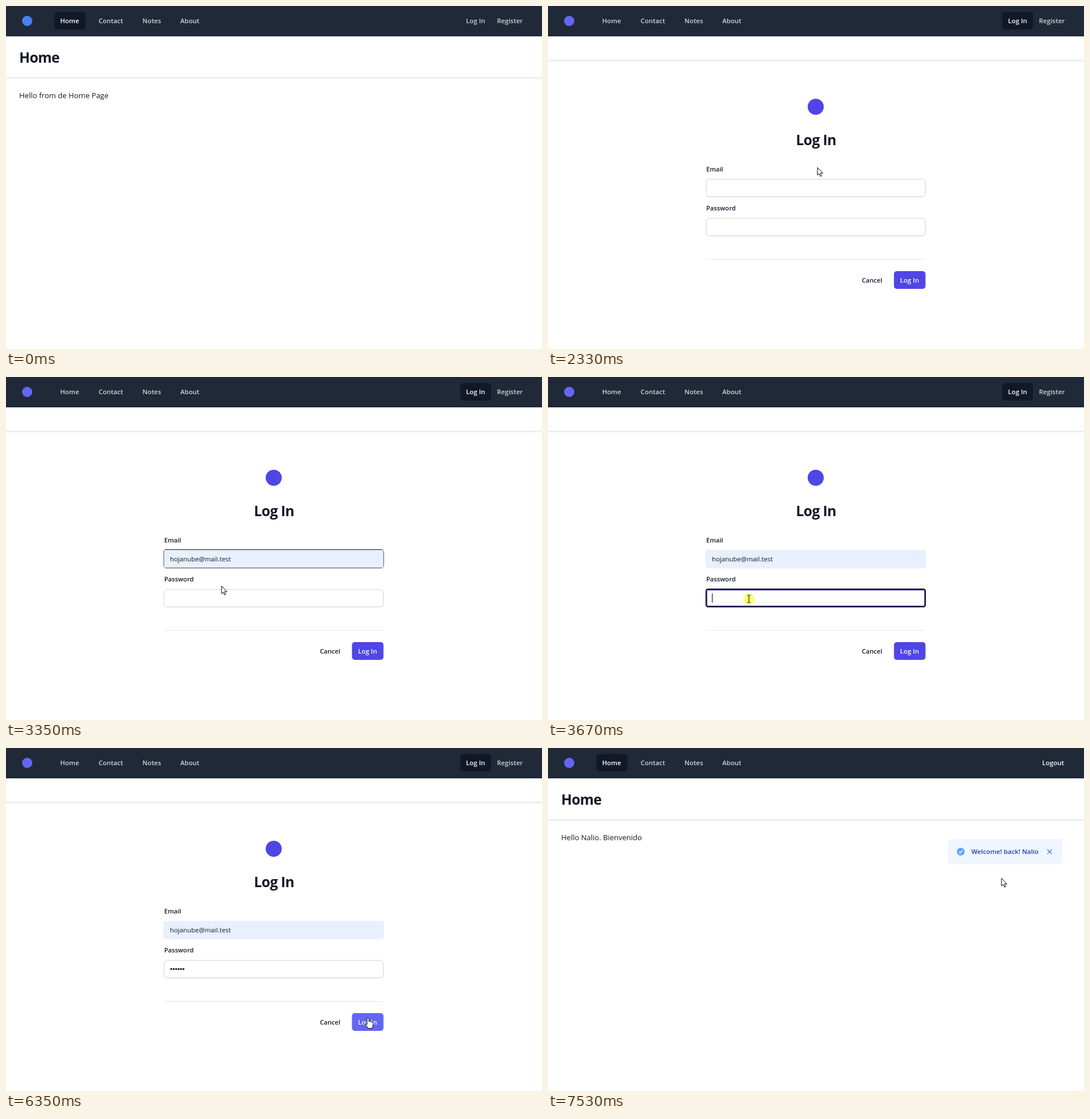
These frames come from a looping animation (935x599 px, 8000 ms). An HTML page:

```html
<!DOCTYPE html>
<html lang="en">
<head>
<meta charset="utf-8">
<title>Log in flow</title>
<style>
  html, body { margin: 0; width: 100%; height: 100%; overflow: hidden; background: #fff; }
  svg { display: block; width: 935px; height: 599px; }
  text { font: 600 11.4px "Open Sans", "Noto Sans", sans-serif; fill: #111827; white-space: pre; }
  .nav text { fill: #d1d5db; }
  .nav .on, .white { fill: #fff; }
  .pill { fill: #111827; }
  .title { font-size: 24.6px; font-weight: 700; letter-spacing: -.025em; }
  .body { font-size: 13px; font-weight: 400; }
  .label { font-size: 11.1px; }
  .value { font-weight: 400; }
  #list text { font-size: 10.9px; font-weight: 500; }
  .rule { fill: #e5e7eb; }
  .field { fill: #fff; stroke: #d1d5db; }
  .ring { fill: #fff; stroke: #12122b; stroke-width: 2.4; }
  .ring + rect { fill: none; stroke: #6366f1; stroke-width: .8; }
  .soft { filter: drop-shadow(0 1px 1px #0001); }
  .pointer { fill: #fff; stroke: #000; stroke-width: 1; stroke-linejoin: round; }
</style>
</head>
<body>
<svg viewBox="0 0 935 599">
  <g class="nav">
    <rect width="935" height="53" fill="#1f2937"/>
    <circle id="logo" cx="37" cy="26" r="9"/>
    <rect id="homePill" class="pill" x="84.5" y="10.5" width="54" height="30.5" rx="5"/>
    <rect id="loginPill" class="pill" x="792.5" y="10.5" width="53.5" height="30.5" rx="5"/>
    <text id="homeLink" x="94.5" y="30">Home</text>
    <text x="161.5" y="30">Contact</text>
    <text x="238" y="30">Notes</text>
    <text x="304" y="30">About</text>
    <g id="guest">
      <text id="loginLink" x="802.5" y="30">Log In</text>
      <text x="856.5" y="30">Register</text>
    </g>
    <text id="logout" class="on" x="862" y="30">Logout</text>
  </g>

  <g id="home">
    <text class="title" x="23" y="99">Home</text>
    <rect class="rule soft" y="124.5" width="935" height="1.5"/>
    <text id="greeting" class="body" x="23" y="160.5"></text>
    <g id="toast">
      <rect x="697.5" y="159" width="200" height="44" rx="5" fill="#eff6ff"/>
      <circle cx="720" cy="181" r="6.8" fill="#60a5fa"/>
      <path d="M717 181.2l2.1 2.2 3.8-4.8" fill="none" stroke="#fff" stroke-width="1.4"/>
      <text x="738.5" y="185" fill="#1e40af" style="fill:#1e40af">Welcome! back! Nalio</text>
      <path d="M871 177l8 8m0-8l-8 8" stroke="#3b82f6" stroke-width="1.3"/>
    </g>
  </g>

  <g id="login">
    <rect class="rule soft" y="94" width="935" height="1.5"/>
    <circle id="mark" cx="467" cy="176" r="14" fill="#4f46e5"/>
    <text class="title" x="467.5" y="242.5" text-anchor="middle">Log In</text>
    <text class="label" x="276" y="289">Email</text>
    <text class="label" x="276" y="357">Password</text>
    <rect class="field soft" x="276" y="302.5" width="382" height="30" rx="5"/>
    <rect class="field soft" x="276" y="371" width="382" height="30" rx="5"/>
    <g id="emailFocus">
      <rect class="ring" x="276" y="302.2" width="382" height="30.4" rx="3"/>
      <rect x="277.8" y="304" width="378.6" height="27" rx="3"/>
    </g>
    <g id="filled">
      <rect x="275.5" y="302" width="383" height="31" rx="2" fill="#e8f0fe"/>
      <text class="value" x="286" y="321.8">hojanube@mail.test</text>
    </g>
    <g id="passFocus">
      <rect class="ring" x="276" y="370.7" width="382" height="30.4" rx="3"/>
      <rect x="277.8" y="372.5" width="378.6" height="27" rx="3"/>
    </g>
    <g id="dots"></g>
    <rect id="caret" width="1" height="16"/>
    <rect class="rule" x="276" y="442" width="382" height="1"/>
    <text x="547.5" y="483" class="label">Cancel</text>
    <rect id="button" x="603.5" y="463" width="55" height="31" rx="5"/>
    <text class="white" style="fill:#fff" x="614" y="483">Log In</text>
    <g id="list">
      <rect x="360.5" y="341" width="193.5" height="191" rx="5" fill="#f7fbff"
        style="filter:drop-shadow(0 1px 2px #0005)"/>
      <rect x="363.5" y="344" width="187.5" height="30.5" rx="4" fill="#e9eef1"/>
      <path d="M531.7 355.7l7 7m0-7l-7 7" stroke="#1f2937" stroke-width="1.4"/>
    </g>
  </g>

  <g id="cursor">
    <circle id="click" r="10" fill="#ffff80"/>
    <path id="arrow" class="pointer" d="M0 0V13.5L3 10.7 5 15.5 7.2 14.6 5.2 9.9H9.5Z"/>
    <path id="hand" class="pointer" d="M-1.6 1.6Q0-.8 1.6 1.6V6.5Q3.2 5.3 4.2 6.9 5.8 5.9 6.7 7.6 8.3 6.9 8.8 8.8V13Q8.8 16 7 18.5H-.2Q-1.5 15.5-4.6 11.8-4.6 9.8-1.6 12Z"/>
    <path id="beam" d="M-3-6.5H-1L0-6 1-6.5H3M0-6V6M-3 6.5H-1L0 6 1 6.5H3" fill="none" stroke="#000"/>
  </g>
</svg>
<script>
const LOOP = 8000;
const $ = id => document.getElementById(id);
const show = (id, on) => { $(id).style.display = on ? '' : 'none'; };

// Pointer samples as the screen recorder took them: time, x, y, shape, clicking
const pointer = [
  [0, 0, 0, ''],
  [340, 825, 440, 'arrow'], [500, 823, 330, 'arrow'], [670, 821, 190, 'arrow'],
  [830, 821, 90, 'arrow'], [1000, 823, 34, 'hand'], [1160, 823.5, 24, 'hand'],
  [1830, 770, 76, 'arrow'], [2000, 610, 190, 'arrow'], [2170, 470, 282, 'arrow'],
  [2340, 402, 312, 'beam'], [2510, 391, 314, 'beam'], [2670, 391, 314, 'beam', 1],
  [2840, 392, 328, 'beam'], [3010, 393, 346, 'arrow'], [3180, 391, 355, 'arrow', 1],
  [3350, 376, 365, 'arrow'], [3510, 351, 387.5, 'beam'], [3670, 350.5, 387.5, 'beam', 1],
  [3850, 0, 0, ''],
  [5330, 420, 369, 'beam'], [5500, 700, 420, 'arrow'], [5670, 851.5, 474, 'arrow'],
  [5850, 810, 477, 'arrow'], [6010, 725, 476, 'arrow'], [6180, 640, 473, 'hand'],
  [6350, 631.5, 471, 'hand'],
  [6530, 668, 430, 'arrow'], [6700, 752, 320, 'arrow'], [6860, 792, 259, 'arrow'],
  [7350, 793, 242, 'arrow'], [7530, 791, 227.5, 'arrow']
];
// Password length over time
const typed = [[0, 0], [4350, 2], [4510, 3], [4850, 5], [5010, 6]];
const at = (steps, t) => steps.findLast(step => step[0] <= t);

['hojanube@mail.test', 'hojamando@mail.test', 'plumatil27@centro.test', 'nomada@mail.test',
 'hojaprado.docente@mail.test', 'compas@mail.test'].forEach((mail, i) => {
  $('list').insertAdjacentHTML('beforeend',
    `<text x="370.5" y="${363.3 + i * 30.75}">${mail}</text>`);
});
for (let i = 0; i < 6; i++) {
  $('dots').insertAdjacentHTML('beforeend',
    `<circle cx="${288.3 + i * 4.25}" cy="386" r="1.75" fill="#111827"/>`);
}

function draw(now) {
  const t = now % LOOP;
  const within = (from, to) => t >= from && t < to;
  const login = within(1500, 6700), welcome = t >= 6700;

  show('login', login);
  show('home', !login);
  show('homePill', !login);
  show('loginPill', login);
  show('guest', !welcome);
  show('logout', welcome);
  show('toast', welcome);
  $('homeLink').classList.toggle('on', !login);
  $('loginLink').classList.toggle('on', login);
  $('greeting').textContent = welcome ? 'Hello Nalio. Bienvenido' : 'Hello from de Home Page';

  // Logos load slightly after each page change
  show('logo', !within(1500, 1660) && !within(6700, 6860));
  $('logo').setAttribute('fill', t < 1500 ? '#4c80ee' : '#6366f1');
  show('mark', t >= 1660);

  const emailFocus = within(2670, 3670), passFocus = within(3670, 6350);
  show('emailFocus', emailFocus);
  show('passFocus', passFocus);
  show('list', within(2840, 3350));
  show('filled', t >= 3350);
  $('button').setAttribute('fill', within(6180, 6530) ? '#6366f1' : '#4f46e5');

  const count = at(typed, t)[1];
  [...$('dots').children].forEach((dot, i) => { dot.style.display = i < count ? '' : 'none'; });
  show('caret', within(2670, 3350) || within(3670, 5500));
  $('caret').setAttribute('x', 286 + count * 4.25);
  $('caret').setAttribute('y', passFocus ? 378 : 310);

  const [, x, y, shape, clicking] = at(pointer, t);
  $('cursor').setAttribute('transform', `translate(${x} ${y})`);
  for (const id of ['arrow', 'hand', 'beam']) show(id, id === shape);
  show('click', clicking);
  requestAnimationFrame(draw);
}
draw(0);
</script>
</body>
</html>
```
